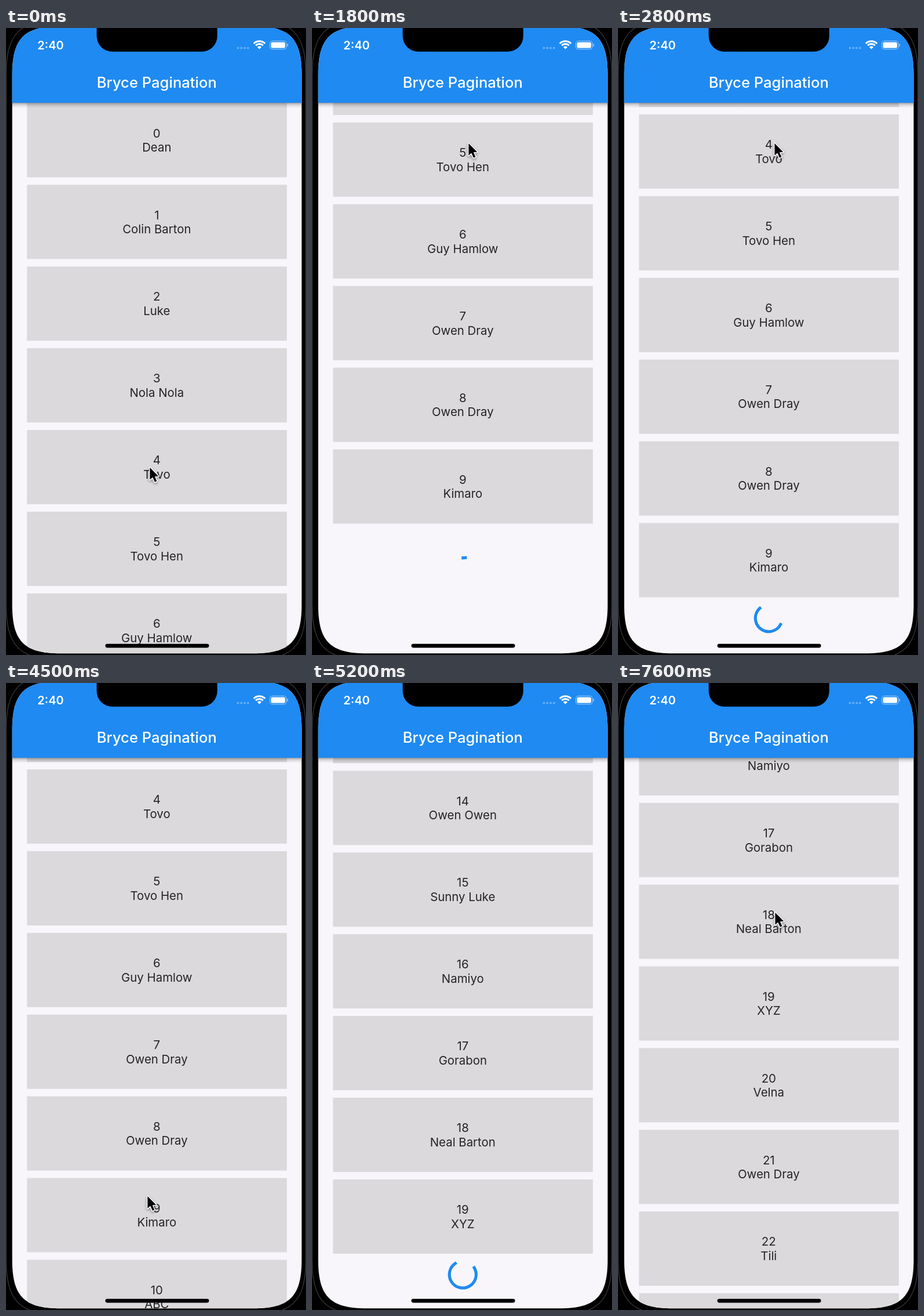
Recreate the animation shown at these times as an HTML page with a canvas. Size 518 by 1081 pixels, loop 7700 ms.

```html
<!DOCTYPE html>
<html lang="en">
<head>
<meta charset="utf-8">
<title>Pagination demo</title>
<style>
html, body { margin: 0; width: 100%; height: 100%; overflow: hidden; background: #000; }
canvas { display: block; width: 518px; height: 1081px; }
</style>
</head>
<body>
<canvas id="stage"></canvas>
<script>
const W = 518, H = 1081, LOOP = 7700, STEP = 100;
const FONT = 'Inter, "Noto Sans", sans-serif';
const BLUE = '#1f8af2', PAGE = '#f8f6fa', CARD = '#dbd9dc', INK = '#242326';
const PAGE_SIZE = 10, PITCH = 140.9, CARD_H = 128, TOP = 129.4, MID = 260.3;
const END1 = 544, END2 = END1 + PAGE_SIZE * PITCH;

const names = [
  'Dean', 'Colin Barton', 'Luke', 'Nola Nola', 'Tovo', 'Tovo Hen', 'Guy Hamlow',
  'Owen Dray', 'Owen Dray', 'Kimaro', 'ABC', 'Dean Hale', 'Colin', 'Mina Hen',
  'Owen Owen', 'Sunny Luke', 'Namiyo', 'Gorabon', 'Neal Barton', 'XYZ',
  'Velna', 'Owen Dray', 'Tili', 'Luke'
];

const canvas = document.getElementById('stage');
const ctx = canvas.getContext('2d');
const dpr = window.devicePixelRatio || 1;
canvas.width = Math.round(W * dpr);
canvas.height = Math.round(H * dpr);

const lerp = (a, b, k) => a + (b - a) * k;
const part = (t, from, to) => Math.min(1, Math.max(0, (t - from) / (to - from)));
const glide = (t, from, to) => {
  const k = part(t, from, to);
  return k * k * (3 - 2 * k);
};

// Drag past the end and spring back, flick to the next end, then a last drag.
function scrollAt(t) {
  if (t <= 1800) return 671 * glide(t, 1600, 1800);
  if (t <= 4500) {
    const s = 14 * (t - 1800) / 1000;
    return END1 + 127 * (1 + s) * Math.exp(-s);
  }
  const flick = 1 - (1 - part(t, 4500, 5230)) ** 2;
  return lerp(END1, END2, flick) + 365 * glide(t, 7300, 7600);
}

// Pointer moves: start, end, x, y reached.
const moves = [
  [200, 1400, 246, 874],
  [1600, 1800, 270, 198],
  [3300, 4200, 244, 884],
  [4500, 4800, 268, -50],
  [5500, 6000, 239, 693],
  [6700, 7200, 246, 782],
  [7300, 7600, 271, 395]
];

function pointerAt(t) {
  let x = 248, y = 757;
  for (const [from, to, nx, ny] of moves) {
    const k = glide(t, from, to);
    x = lerp(x, nx, k);
    y = lerp(y, ny, k);
  }
  return [x, y];
}

const countAt = t => PAGE_SIZE * (1 + (t >= 3700) + (t >= 7000));

// cubic-bezier(.4, 0, .2, 1)
function swift(x) {
  if (x <= 0) return 0;
  if (x >= 1) return 1;
  let lo = 0, hi = 1, u = 0.5;
  for (let i = 0; i < 20; i++) {
    u = (lo + hi) / 2;
    const v = 1 - u;
    if (1.2 * v * v * u + 0.6 * v * u * u + u * u * u < x) lo = u; else hi = u;
  }
  return 3 * (1 - u) * u * u + u * u * u;
}

function spinner(y, t) {
  const time = t - 628 + 5 * 1333;
  const cycle = time / 1333 % 1, turn = time / 2222 % 1;
  const head = swift(cycle * 2), tail = swift(cycle * 2 - 1);
  const start = Math.PI * (-0.5 + 1.5 * tail + 2 * turn + 0.5 * cycle);
  const sweep = Math.max(1.5 * Math.PI * (head - tail), 0.001);
  ctx.strokeStyle = BLUE;
  ctx.lineWidth = 5.1;
  ctx.lineCap = 'square';
  ctx.beginPath();
  ctx.arc(MID, y, 23.1, start, start + sweep);
  ctx.stroke();
}

function pill(x, y, w, h, r, color) {
  ctx.fillStyle = color;
  ctx.beginPath();
  ctx.roundRect(x, y, w, h, r);
  ctx.fill();
}

// Rectangle with continuous corners; each curve takes up the given reach.
function smoothRect(x, y, w, h, reach) {
  const c = reach * 0.244, r = x + w, b = y + h;
  ctx.beginPath();
  ctx.moveTo(x + reach, y);
  ctx.lineTo(r - reach, y);
  ctx.bezierCurveTo(r - c, y, r, y + c, r, y + reach);
  ctx.lineTo(r, b - reach);
  ctx.bezierCurveTo(r, b - c, r - c, b, r - reach, b);
  ctx.lineTo(x + reach, b);
  ctx.bezierCurveTo(x + c, b, x, b - c, x, b - reach);
  ctx.lineTo(x, y + reach);
  ctx.bezierCurveTo(x, y + c, x + c, y, x + reach, y);
  ctx.closePath();
}

function label(text, x, y, size, weight, color) {
  ctx.font = `${weight} ${size}px ${FONT}`;
  ctx.fillStyle = color;
  ctx.fillText(text, x, y);
}

function list(t) {
  const first = TOP - scrollAt(t), count = countAt(t);
  for (let i = 0; i < count; i++) {
    const y = first + i * PITCH;
    if (y > H || y + CARD_H < 100) continue;
    ctx.fillStyle = CARD;
    ctx.fillRect(36.3, y, 448.7, CARD_H);
    label(i, MID, y + 59.2, 20.4, 400, INK);
    label(names[i] || '', MID, y + 83.8, 20.4, 400, INK);
  }
  spinner(first + (count - 1) * PITCH + CARD_H + 36, t);
}

function statusBar() {
  label('2:40', 77, 36.8, 20, 600, '#fff');
  for (let i = 0; i < 4; i++) {
    pill(398.5 + i * 5.8, 32.5, 4, 4, 2, 'rgba(255,255,255,.3)');
  }
  ctx.strokeStyle = ctx.fillStyle = '#fff';
  ctx.lineCap = 'butt';
  ctx.lineWidth = 3;
  const fan = r => ctx.arc(437.5, 36.5, r, -Math.PI * 0.75, -Math.PI * 0.25);
  for (const r of [9, 13.8]) {
    ctx.beginPath();
    fan(r);
    ctx.stroke();
  }
  ctx.beginPath();
  ctx.moveTo(437.5, 36.5);
  fan(5.2);
  ctx.fill();
  ctx.strokeStyle = 'rgba(255,255,255,.45)';
  ctx.lineWidth = 1.3;
  ctx.beginPath();
  ctx.roundRect(455.5, 22.3, 28.5, 14.4, 4.5);
  ctx.stroke();
  pill(457.6, 24.4, 24.3, 10.2, 2.6, '#fff');
  pill(485.3, 27, 1.7, 5, 1, 'rgba(255,255,255,.5)');
}

function header() {
  const shade = ctx.createLinearGradient(0, 129, 0, 138);
  shade.addColorStop(0, 'rgba(0,0,0,.34)');
  shade.addColorStop(0.4, 'rgba(0,0,0,.13)');
  shade.addColorStop(1, 'rgba(0,0,0,0)');
  ctx.fillStyle = shade;
  ctx.fillRect(0, 129, W, 9);
  ctx.fillStyle = BLUE;
  ctx.fillRect(0, 0, W, 129);
  label('Bryce Pagination', MID, 102.6, 25.6, 500, '#fff');
  statusBar();
}

function cursor(t) {
  const shape = [[0, 0], [0, 21], [4.8, 16.8], [8.6, 25], [12, 23.5], [8.4, 15.4], [14.8, 15]];
  const [x, y] = pointerAt(t);
  ctx.save();
  ctx.translate(x + 0.4, y + 0.8);
  ctx.beginPath();
  shape.forEach(p => ctx.lineTo(...p));
  ctx.closePath();
  ctx.lineJoin = 'round';
  ctx.lineWidth = 3;
  ctx.strokeStyle = '#fff';
  ctx.shadowColor = 'rgba(0,0,0,.4)';
  ctx.shadowBlur = 4 * dpr;
  ctx.shadowOffsetY = 2 * dpr;
  ctx.stroke();
  ctx.shadowColor = 'transparent';
  ctx.fillStyle = '#000';
  ctx.fill();
  ctx.restore();
}

function draw(t) {
  ctx.setTransform(dpr, 0, 0, dpr, 0, 0);
  ctx.textAlign = 'center';
  ctx.fillStyle = '#000';
  ctx.fillRect(0, 0, W, H);
  smoothRect(0.3, -14, 517.4, 1103, 95);
  ctx.strokeStyle = '#3c3c3e';
  ctx.lineWidth = 1.2;
  ctx.stroke();

  ctx.save();
  smoothRect(10.7, -3, 499.8, 1081.3, 84);
  ctx.clip();
  ctx.fillStyle = PAGE;
  ctx.fillRect(0, 0, W, H);
  list(t);
  header();
  ctx.restore();

  pill(156.6, -40, 208.2, 80.8, 27, '#000');
  pill(171.5, 1061.8, 179, 6.6, 3.3, '#000');
  cursor(t);
}

const begin = performance.now();
function frame() {
  const t = (performance.now() - begin) % LOOP;
  draw(Math.floor(t / STEP) * STEP);
  requestAnimationFrame(frame);
}
frame();
</script>
</body>
</html>
```
